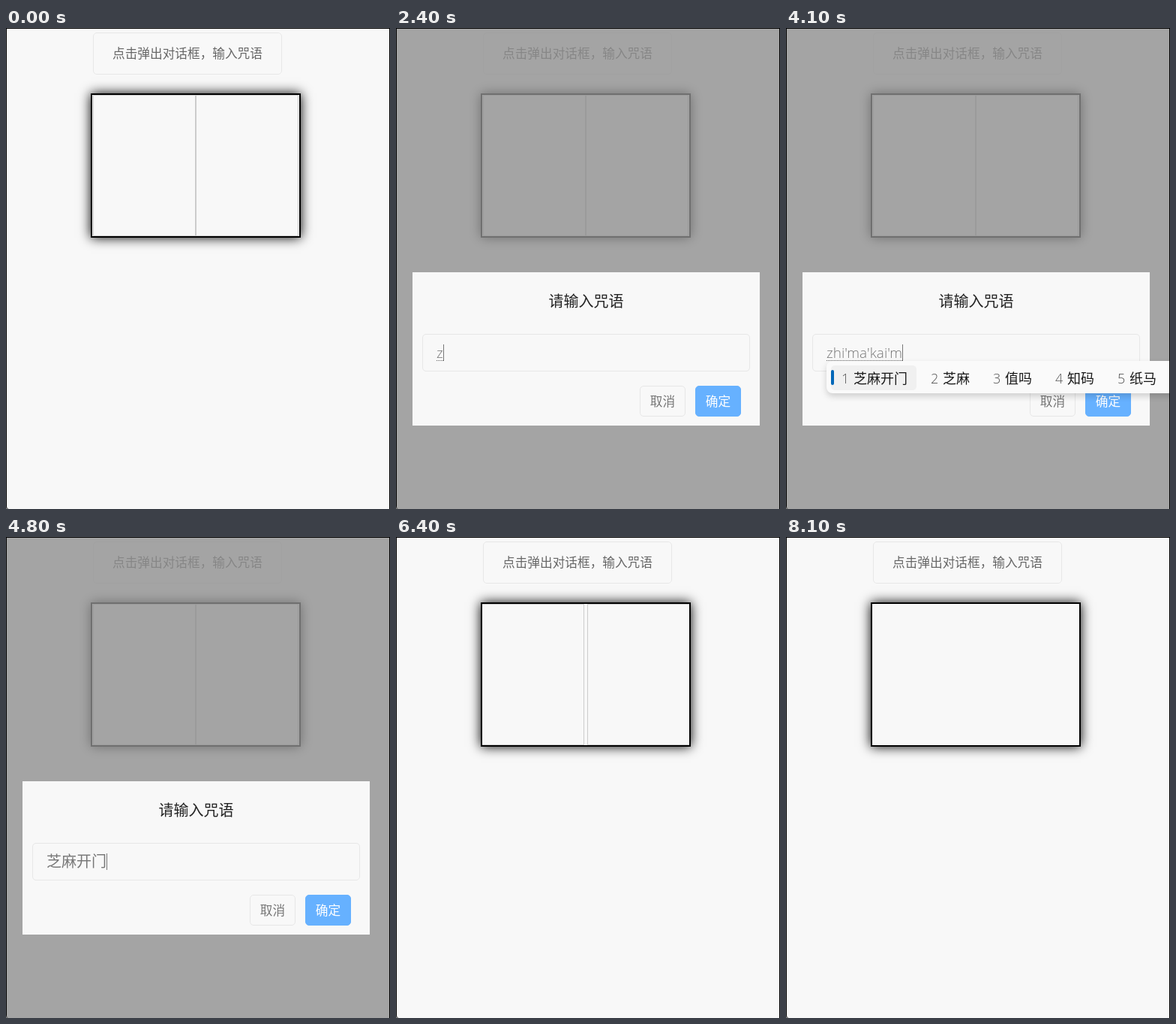
Write an HTML page that moves like this. It is 512x640 px and loops after 8.4 s.

```html
<!DOCTYPE html>
<html lang="zh-CN">
<head>
<meta charset="utf-8">
<style>
* { box-sizing: border-box; }
html, body { margin: 0; width: 100%; height: 100%; overflow: hidden; background: #888; }
body { font: 300 16.67px "Open Sans", "Noto Sans CJK SC", sans-serif; color: #666; }
div { position: absolute; }
#win { left: 0; top: 0; width: 512px; height: 640px; overflow: hidden; background: #f8f8f8;
  border: solid #000; border-width: 1px 1px 0; border-bottom-left-radius: 4px; }
#page { left: -1px; top: -1px; width: 512px; height: 640px; }
.btn { border: 1px solid #e7e7e7; border-radius: 5px; text-align: center; white-space: nowrap; }
#open { left: 116px; top: 6px; width: 252px; height: 56px; line-height: 54px; }
#frame { left: 113px; top: 87px; width: 280px; height: 192px; overflow: hidden;
  border: 2px solid #000; box-shadow: 0 0 15px #000; }
.door { top: 0; width: 137px; height: 188px; border: 1px solid #ccc; }
#left { left: 1px; }
#right { left: 138px; }
#mask { left: 0; top: 0; width: 510px; height: 640px; background: rgba(142, 142, 142, .79); }
#dialog { left: 21px; top: 324px; width: 463px; height: 204px; background: #f8f8f8; }
#title { top: 19px; width: 100%; text-align: center; font-size: 20px; line-height: 40px; color: #222; }
#input { left: 13px; top: 82px; width: 437px; height: 50px; }
#field { left: 32px; top: 96px; height: 22px; line-height: 22px; font-size: 20px;
  color: #777; white-space: nowrap; display: flex; }
#text.pinyin { font-size: 19px; border-bottom: 1px dotted #666; }
#caret { width: 1px; height: 22px; background: #777; }
.small { top: 151px; width: 61px; height: 41px; line-height: 39px; color: #777; }
#cancel { left: 303px; }
#ok { left: 377px; background: #66b1ff; border-color: #66b1ff; color: #fff; }
#ime { left: 53px; top: 442px; width: 560px; height: 43px; padding: 6px; display: flex;
  background: #fafafa; border-radius: 8px; box-shadow: 0 4px 9px rgba(0, 0, 0, .17);
  font-size: 18px; line-height: 34px; color: #1a1a1a; white-space: nowrap; }
#ime span { flex: none; height: 33px; margin-right: 5px; padding: 0 12px 0 14px; border-radius: 5px; }
#ime span:first-child { background: #f0f0f0; }
#ime i { display: inline-block; width: 16px; font-style: normal; color: #555; }
#bar { left: 6px; top: 12px; width: 4px; height: 20px; border-radius: 2px; background: #0067b8; }
</style>
</head>
<body>
<div id="win">
  <div id="page">
    <div id="open" class="btn">点击弹出对话框，输入咒语</div>
    <div id="frame"><div id="left" class="door"></div><div id="right" class="door"></div></div>
  </div>
  <div id="modal">
    <div id="mask"></div>
    <div id="dialog">
      <div id="title">请输入咒语</div>
      <div id="input" class="btn"></div>
      <div id="field"><span id="text"></span><span id="caret"></span></div>
      <div id="cancel" class="btn small">取消</div>
      <div id="ok" class="btn small">确定</div>
    </div>
    <div id="ime"></div>
  </div>
</div>
<script>
const LOOP = 8400, TICK = 100, OPEN_AT = 6344, OPEN_TIME = 2000, TRAVEL = 139;
const $ = id => document.getElementById(id);

const words = "芝麻 值吗 知码 纸马 直码 之";
// [time, typed text, candidates]
const typing = [
  [0, "", ""],
  [2400, "z", ""],
  [2500, "z", "在 这 中 做 怎 再 则"],
  [2700, "zh", "这 中 着 只 之 找 真"],
  [2800, "zhi", "只 之 知 直 指 至 值"],
  [3000, "zhi'm", "芝麻 致命 知名 殖民 指明 之"],
  [3200, "zhi'ma", words],
  [3600, "zhi'ma'k", "之马克 " + words],
  [3800, "zhi'ma'ka", "芝麻卡 " + words],
  [3900, "zhi'ma'kai", "芝麻开 " + words],
  [4100, "zhi'ma'kai'm", "芝麻开门 " + words],
  [4300, "zhi'ma'kai'me", "芝麻开门 " + words],
  [4400, "zhi'ma'kai'men", "芝麻开门 " + words],
  [4800, "芝麻开门", ""]
];
const caretSpans = [[1400, 2000], [2400, 5300], [5700, 6200]];
const within = (t, [from, to]) => t >= from && t < to;
const show = (id, on) => $(id).style.visibility = on ? "visible" : "hidden";

// CSS "ease": cubic-bezier(.25, .1, .25, 1)
function ease(x) {
  if (x <= 0) return 0;
  if (x >= 1) return 1;
  let lo = 0, hi = 1, s;
  for (let i = 0; i < 24; i++) {
    s = (lo + hi) / 2;
    if (.75 * s - .75 * s * s + s ** 3 < x) lo = s; else hi = s;
  }
  return .3 * s * (1 - s) ** 2 + 3 * s * s * (1 - s) + s ** 3;
}

let current;
function setTyping(step) {
  if (step === current) return;
  current = step;
  const [, text, list] = step;
  $("text").textContent = text;
  $("text").className = /^[a-z]/.test(text) ? "pinyin" : "";
  $("ime").innerHTML = list.split(" ").map((word, i) => `<span><i>${i + 1}</i>${word}</span>`).join("")
    + '<div id="bar"></div>';
  $("ime").style.display = list ? "flex" : "none";
}

function draw(now) {
  const t = Math.floor(now % LOOP / TICK) * TICK;
  $("modal").style.display = within(t, [800, 6400]) ? "block" : "none";
  setTyping(typing.findLast(step => t >= step[0]));
  show("caret", caretSpans.some(span => within(t, span)));
  const shift = Math.round(TRAVEL * ease((t - OPEN_AT) / OPEN_TIME));
  $("left").style.transform = `translateX(${-shift}px)`;
  $("right").style.transform = `translateX(${shift}px)`;
}

const start = performance.now();
function loop() {
  draw(performance.now() - start);
  requestAnimationFrame(loop);
}
loop();
</script>
</body>
</html>
```
